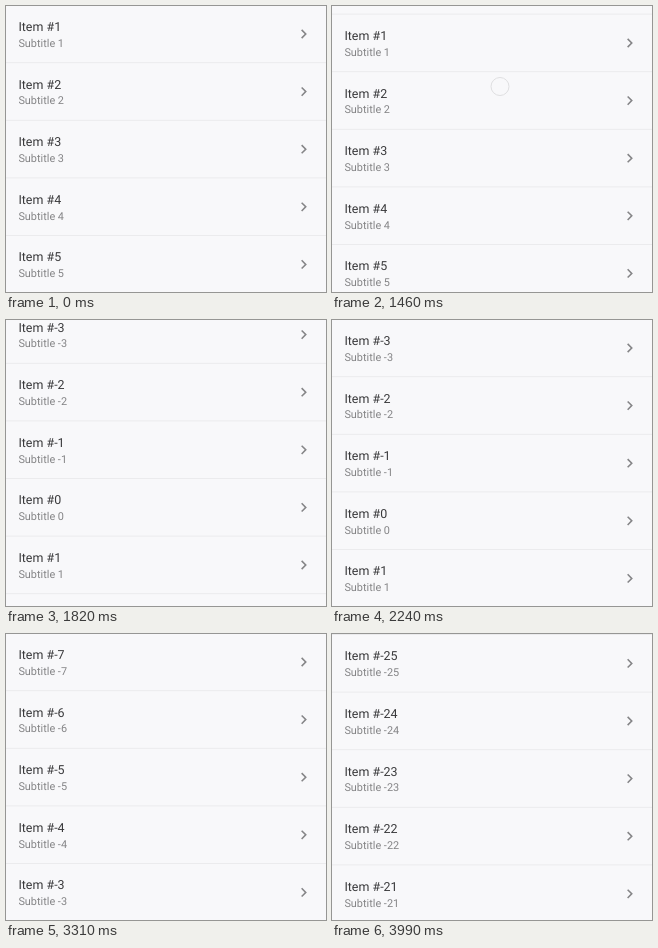
An HTML page that plays this animation: 320 by 286 pixels, repeating every 4.05 s.

```html
<!DOCTYPE html>
<html lang="en">
<head>
<meta charset="utf-8">
<title>Endless list</title>
<style>
  html, body { margin: 0; width: 100%; height: 100%; overflow: hidden; background: #f8f8fa; }
  svg { display: block; width: 320px; height: 286px; }
  text { font-family: Roboto, Arial, sans-serif; text-rendering: geometricPrecision; }
  .title { font-size: 12.46px; fill: #39393b; }
  .sub { font-size: 10.9px; fill: #848486; }
  .chevron { fill: #858587; }
  .rule { fill: #ebebed; }
  #touch { fill: #f9f9fa; stroke: #cdcdcf; stroke-width: 1; }
</style>
</head>
<body>
<svg id="stage" viewBox="0 0 320 286"></svg>
<script>
const LOOP = 4050, STEP = 60, ROW = 57.6, ROWS = 7;
const stage = document.getElementById('stage');

// Each swipe: start time, scroll at start, finger position,
// scroll distance per step and finger opacity per step.
const swipes = [
  { at: 1460, from: 0, x: 168, y: 71.5,
    move: [9, 43, 93, 143.5, 180, 203, 217, 225, 229.6, 230.4],
    finger: [.6, 1, 1, 1, .5] },
  { at: 2950, from: 4 * ROW, x: 160, y: 119,
    move: [9, 36, 79.6, 140, 187, 218, 230.4],
    finger: [.6, 1, 1, .5] },
  { at: 3630, from: 8 * ROW, x: 147, y: 125.6,
    move: [10, 45, 95, 153.4, 520, 840, 1038.2],
    finger: [.6, 1, 1, .6] }
];

function add(parent, tag, attrs) {
  const el = document.createElementNS('http://www.w3.org/2000/svg', tag);
  for (const key in attrs) el.setAttribute(key, attrs[key]);
  return parent.appendChild(el);
}

const rows = Array.from({ length: ROWS }, () => {
  const g = add(stage, 'g', {});
  add(g, 'rect', { class: 'rule', x: 0, y: 56.2, width: 320, height: 1 });
  add(g, 'path', {
    class: 'chevron', transform: 'translate(288.4 18.66) scale(.7786)',
    d: 'M10 6L8.59 7.41 13.17 12l-4.58 4.59L10 18l6-6z'
  });
  return {
    g,
    title: add(g, 'text', { class: 'title', x: 12.4, y: 25 }),
    sub: add(g, 'text', { class: 'sub', x: 12.4, y: 40.9 })
  };
});
const touch = add(stage, 'circle', { id: 'touch', r: 9 });

function stateAt(t) {
  const swipe = swipes.filter(s => s.at <= t).pop();
  if (!swipe) return { scroll: 0, x: 0, y: 0, alpha: 0 };
  const step = Math.floor((t - swipe.at) / STEP);
  const moved = swipe.move[Math.min(step, swipe.move.length - 1)];
  return {
    scroll: swipe.from + moved,
    x: swipe.x,
    y: swipe.y + moved,
    alpha: swipe.finger[step] || 0
  };
}

function draw(t) {
  const { scroll, x, y, alpha } = stateAt(t);
  const first = Math.floor(-scroll / ROW);
  rows.forEach((row, i) => {
    const index = first + i;
    row.g.setAttribute('transform', `translate(0 ${(index * ROW + scroll).toFixed(2)})`);
    row.title.textContent = `Item #${index + 1}`;
    row.sub.textContent = `Subtitle ${index + 1}`;
  });
  touch.setAttribute('cx', x);
  touch.setAttribute('cy', y);
  touch.setAttribute('opacity', alpha);
}

const start = performance.now();
function tick() {
  draw((performance.now() - start) % LOOP);
  requestAnimationFrame(tick);
}
tick();
</script>
</body>
</html>
```
